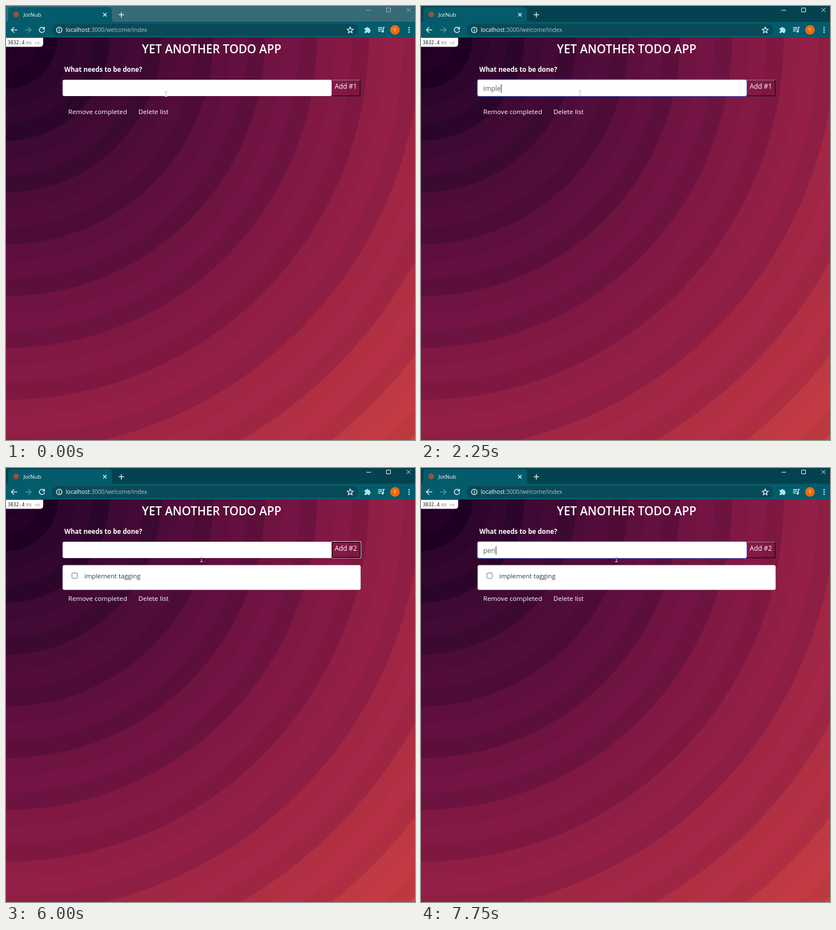
Write an HTML page that moves like this. It is 726x771 px and loops after 8 s.

```html
<!DOCTYPE html>
<html lang="en">
<head>
<meta charset="utf-8">
<title>Todo list</title>
<style>
  html, body { margin: 0; width: 100%; height: 100%; overflow: hidden; background: #210024; }
  svg { display: block; font: 11.65px "Open Sans", "Noto Sans", sans-serif; fill: #fff; }
  .icon { fill: none; stroke: #d3eef2; stroke-width: 1.5; }
  .small { font-size: 9.85px; fill: #202124; }
  .mono { font-family: "DejaVu Sans Mono", monospace; font-size: 8.3px; fill: #222; }
  .dark { fill: #30353a; }
</style>
</head>
<body>
<svg width="726" height="771" viewBox="0 0 726 771">
  <g id="rings"></g>

  <g id="browser">
    <rect id="strip" width="726" height="28"/>
    <path d="M0 56V28Q4 28 4 23V8Q4 2 10 2H182Q188 2 188 8V23Q188 28 193 28H726V56Z" fill="#045b6b"/>
    <circle cx="18" cy="15" r="5" fill="#9a5338"/>
    <text x="31" y="18.5" font-size="9.8">JotNub</text>
    <path class="icon" d="M172.5 12.5l6 6m0-6l-6 6M200 15.5h9.5M204.700 11v9.500"/>
    <g id="controls" fill="none">
      <path d="M640 7.500h8M675.500 3.500h7v7h-7zM711 3.500l7 7m0-7l-7 7"/>
    </g>
    <rect x="81" y="32" width="544" height="21" rx="10.5" fill="#0a4957"/>
    <path class="icon" d="M20 42.500H10M14.500 37.500l-5 5 5 5M67.500 39.500a4.700 4.700 0 1 0 1 3.500"/>
    <path d="M69 36.500v5h-5z" fill="#d3eef2"/>
    <path class="icon" d="M34 42.500h10M39.500 37.500l5 5-5 5" opacity=".4"/>
    <circle class="icon" cx="94.500" cy="42.500" r="4.800" stroke-width="1.200"/>
    <path class="icon" d="M94.500 41.500v3.800M94.500 39.300v1.300" stroke-width="1.200"/>
    <text x="106" y="46" font-size="10.2">localhost<tspan fill="#a9c7cd">:3000/welcome/index</tspan></text>
    <path class="icon" d="M611 37.500l1.500 3.400 3.700.4-2.800 2.500.8 3.700-3.200-1.900-3.200 1.900.8-3.700-2.800-2.500 3.700-.4z" stroke-width="1.100"/>
    <path d="M637 39h2.500a1.800 1.800 0 0 1 3.600 0h2.700v2.800a1.800 1.800 0 0 1 0 3.600V48h-3a1.600 1.600 0 0 0-3.200 0H636.500v-3a1.600 1.600 0 0 0 0-3.200V39z" fill="#a8e6ee"/>
    <path class="icon" d="M660.500 38.500h7.500M660.500 41.500h7.500M660.500 44.500h4.500M669.800 45v-7h2.500"/>
    <circle cx="668.500" cy="45.200" r="2" fill="#d3eef2"/>
    <circle cx="690.500" cy="42.500" r="8.500" fill="#ee6b0c"/>
    <text x="690.500" y="45.500" font-size="8.5" text-anchor="middle">Y</text>
    <g fill="#d3eef2"><circle cx="715.500" cy="38.500" r="1.300"/><circle cx="715.500" cy="42.500" r="1.300"/><circle cx="715.500" cy="46.500" r="1.300"/></g>
  </g>

  <path d="M0 56.500H66V67Q66 72.500 60 72.500H0Z"/>
  <text class="mono" x="3" y="67.500">3832.4<tspan x="36" fill="#888">ms</tspan><tspan x="51" font-size="7" fill="#999">×4</tspan></text>

  <text x="365" y="84" font-size="20.7" font-weight="600" text-anchor="middle">YET ANOTHER TODO APP</text>
  <text x="103.500" y="117" font-size="11.6" font-weight="700">What needs to be done?</text>

  <g id="raised">
    <path d="M578 131.500H629" stroke="#9a8492"/>
    <path d="M578 159.500H628.500V131.500" fill="none" stroke="#240a1e" stroke-width="1.500"/>
  </g>
  <g id="pressed" fill="none">
    <rect x="577.500" y="130.500" width="52.500" height="29.500" rx="2.500" stroke="#e8dde4" stroke-width="1.200"/>
    <rect x="578.700" y="131.700" width="50" height="27.200" rx="1.500" stroke="#120810" stroke-width="1.500"/>
  </g>
  <text id="add" x="583.500" y="147" font-size="11.85"></text>

  <rect id="glow" x="99.300" y="129.800" width="479.900" height="31.400" rx="4" fill="#3262d2" fill-opacity=".75"/>
  <rect x="100.500" y="131" width="477.500" height="29" rx="3"/>
  <text id="entry" x="110.500" y="151" font-size="11.85" fill="#545b62"></text>
  <rect id="caret" y="139" width="1" height="15" fill="#333"/>

  <g id="item">
    <rect x="100.500" y="172.500" width="529" height="44" rx="3"/>
    <rect x="117" y="186.500" width="9.500" height="9.500" rx="1.500" stroke="#70757a"/>
    <text class="dark" x="139" y="196" font-size="11.4">implement tagging</text>
  </g>
  <g id="links">
    <text x="110.500" y="192">Remove completed</text>
    <text x="235" y="192">Delete list</text>
  </g>

  <g id="popup">
    <rect x="99.500" y="162" width="149" height="95" rx="4" fill="#000" opacity=".2"/>
    <rect id="sheet" x="100.500" y="161" width="147" height="95" rx="3"/>
    <text class="small" x="110" y="185">test</text>
    <text class="small" x="110" y="212.700">make one</text>
    <text class="small" id="third" x="110" y="240.300">implement tagging</text>
  </g>

  <g id="beam" fill="none">
    <path d="M-2.500-4.500h5M0-4.500v8M-2.500 3.500h5" stroke="#777" stroke-width="1.400" opacity=".35"/>
    <path d="M-2.500 3.500h5M0-1v4.500" stroke="#ddd"/>
  </g>
  <path id="hand" d="M-3-8q1.500-1.500 3 0v5l5 1.300q2 .7 1.700 3L5.500 6v3h-7V7l-4.500-5.500q-.3-2 1.500-1.500L-3 1z" stroke="#111" stroke-width=".9"/>
</svg>
<script>
  const $ = id => document.getElementById(id);
  const LOOP = 8000, STEP = 92;
  const shades = ["210024", "2e062c", "3e0933", "4e0c38", "5e0f3d", "6f1341",
                  "801843", "901e45", "a02644", "b02f43", "be3941", "cc453e"];
  const tints = [[0, 0, 0], [5, 1, 3], [-2, 0, -2]];

  // Each shade is three rings wide, the middle one a little brighter.
  for (let n = shades.length * 3 - 1; n >= 0; n--) {
    const base = shades[n / 3 | 0].match(/../g).map(h => parseInt(h, 16));
    const rgb = base.map((v, i) => v + tints[n % 3][i]);
    const ring = document.createElementNS("http://www.w3.org/2000/svg", "circle");
    ring.setAttribute("cy", 55.5);
    ring.setAttribute("r", (n + 1) * STEP / 3);
    ring.setAttribute("fill", `rgb(${rgb})`);
    $("rings").append(ring);
  }

  // Every step changes only what it names.
  const steps = [
    [0, { active: 0, glow: 0, popup: 0, pressed: 0, item: 0, text: "", caret: 0, hand: 0, at: [284, 157] }],
    [250, { active: 1, at: [282, 155] }],
    [500, { glow: .6, popup: .5, caret: 1 }],
    [750, { glow: 1, popup: 1 }],
    [1250, { text: "im", popup: 0 }],
    [1500, { text: "imp" }],
    [1750, { caret: 0 }],
    [2000, { text: "impl", caret: 1 }],
    [2250, { text: "imple" }],
    [2500, { text: "implem" }],
    [2750, { text: "implemen" }],
    [3000, { text: "implement" }],
    [3250, { text: "implement t" }],
    [3500, { text: "implement tag" }],
    [3750, { text: "implement taggi" }],
    [4000, { text: "implement tagging" }],
    [4500, { at: [420, 152] }],
    [4750, { at: [592, 150], hand: 1 }],
    [5000, { at: [598, 149] }],
    [5250, { glow: 0, caret: 0, pressed: 1 }],
    [5500, { item: 1, text: "" }],
    [5750, { at: [460, 158], hand: 0 }],
    [6000, { at: [347, 163] }],
    [6250, { glow: .6, pressed: 0 }],
    [6500, { glow: 1, popup: .6 }],
    [6750, { popup: 1 }],
    [7000, { popup: 0, text: "p", caret: 1 }],
    [7250, { text: "pe" }],
    [7500, { text: "per" }],
    [7750, { text: "peri" }]
  ];

  const set = (id, name, value) => $(id).setAttribute(name, value);
  const fade = (id, value) => set(id, "opacity", value);

  function draw() {
    const t = performance.now() % LOOP;
    const s = Object.assign({}, ...steps.filter(([ms]) => ms <= t).map(([, change]) => change));

    set("strip", "fill", s.active ? "#05424f" : "#376a76");
    set("controls", "stroke", s.active ? "#eef5f6" : "#9db5bb");
    fade("glow", s.glow);
    fade("pressed", s.pressed);
    fade("raised", 1 - s.pressed);
    fade("item", s.item);
    fade("popup", s.popup);
    fade("third", s.item);
    set("sheet", "height", s.item ? 95 : 67);
    set("sheet", "y", 161);
    set("popup", "clip-path", s.item ? "none" : "inset(0 0 27px 0)");
    set("links", "transform", `translate(0 ${s.item * 44})`);
    $("add").textContent = s.item ? "Add #2" : "Add #1";
    $("entry").textContent = s.text;
    set("caret", "x", 111 + $("entry").getComputedTextLength());
    fade("caret", s.caret);
    for (const id of ["beam", "hand"]) set(id, "transform", `translate(${s.at})`);
    fade("beam", 1 - s.hand);
    fade("hand", s.hand);
    requestAnimationFrame(draw);
  }
  draw();
</script>
</body>
</html>
```
